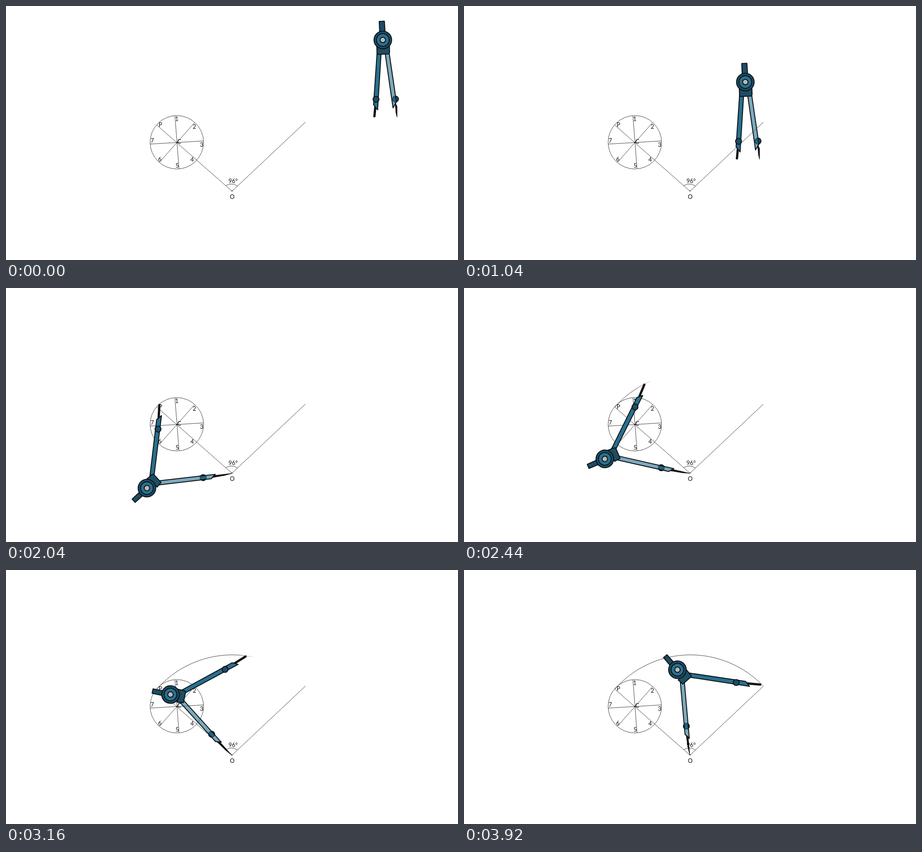
An HTML page that plays this animation: 998 px wide and 561 px high, repeating every 3.96 s.

```html
<!DOCTYPE html>
<html lang="en">
<head>
<meta charset="utf-8">
<title>Compass construction</title>
<style>
  html, body { margin: 0; width: 100%; height: 100%; overflow: hidden; background: #fff; }
  svg { display: block; width: 998px; height: 561px; }
  .thin { fill: none; stroke: #222; stroke-width: .85; }
  text { font: 13px Lato, "Open Sans", sans-serif; text-anchor: middle; fill: #111; }
  .leg, .cap { stroke: #0c1216; stroke-width: 2; stroke-linejoin: round; }
  .leg { fill: #29708f; }
  .cap { fill: #1d4d64; }
  .lead { fill: none; stroke: #111; stroke-width: 5; stroke-linecap: round; }
  .needle { fill: #111; stroke: #111; stroke-linejoin: round; }
</style>
</head>
<body>
<svg viewBox="0 0 998 561">
  <defs>
    <linearGradient id="wipe" gradientUnits="userSpaceOnUse">
      <stop offset="0" stop-color="#222"/>
      <stop offset="1" stop-color="#222" stop-opacity="0"/>
    </linearGradient>
    <g id="head">
      <circle class="cap" r="19.5"/>
      <circle class="leg" r="14"/>
      <circle class="leg" r="6" style="fill:#b8b8b8"/>
    </g>
  </defs>

  <g class="thin">
    <circle cx="377.2" cy="301" r="59"/>
    <path d="M333 263L499 409L661 256.5M373 243L382 359M416 258L339 345M436 298L318 305"/>
    <path d="M485 397Q498 389 511 397.5"/>
  </g>
  <circle cx="377.5" cy="301.5" r="1.3"/>
  <circle cx="499" cy="408.5" r="1.1"/>
  <g id="labels"></g>

  <g id="closed">
    <path class="lead" d="M815.5 222L813.5 243.5"/>
    <path class="needle" d="M859 212L863.5 222L863.5 245.5L861 236Z"/>
    <path class="leg" d="M819.5 100H828.5L820.5 229.5L811.5 218Z"/>
    <circle class="cap" cx="817" cy="206" r="6.6"/>
    <circle class="cap" cx="860" cy="205.5" r="6.6"/>
    <path class="leg" d="M836.5 100H845.5L862 212L854.5 225Z" style="fill-opacity:.6"/>
    <path class="cap" d="M824 34L835.5 33.5L837 58H825Z"/>
    <path class="cap" d="M818.5 88H846.5L847 103L845 106L819.5 107Z"/>
    <use href="#head" x="832" y="75"/>
  </g>

  <g id="open">
    <path class="lead" d="M625 250.5L654 253"/>
    <path class="needle" d="M490.5 365L495 368L498.5 408.5L494.5 392Z"/>
    <path class="leg" d="M497 227.5L622 246L630.5 257L496 236.5Z"/>
    <circle class="cap" cx="601" cy="248.5" r="6.6"/>
    <circle class="cap" cx="491" cy="345" r="6.6"/>
    <path class="leg" d="M477.5 246L488 363L497.5 372L486.5 246Z" style="fill-opacity:.6"/>
    <path class="cap" d="M440.5 193.5L448 187L465 206L457 213Z"/>
    <path class="cap" d="M473 243L483 252L501.5 236V233L490 219Z"/>
    <use href="#head" x="471.3" y="220.3"/>
  </g>

  <path id="arc" class="thin" style="stroke:url(#wipe)" d="M333 263A222.3 222.3 0 0 1 661 256.5"/>
</svg>
<script>
const LOOP = 3960, FRAME = 40;
const MOVE_START = 116, MOVE_END = 1823, SPIN_START = 1990;
const $ = id => document.getElementById(id);
const progress = (t, from, to) => Math.min(1, Math.max(0, (t - from) / (to - from)));
const easeInOut = u => u < .5 ? 2 * u * u : 1 - 2 * (1 - u) ** 2;

const labels = [
  ["P", 341, 267], ["1", 377, 254], ["2", 416, 271], ["3", 432, 311], ["4", 411, 344],
  ["5", 378, 357], ["6", 339.5, 342.5], ["7", 323, 302], ["C", 382.5, 303.5],
  ["O", 499.5, 425.5], ["96°", 501.5, 390.5]
];
$("labels").innerHTML = labels.map(([s, x, y]) => `<text x="${x}" y="${y}">${s}</text>`).join("");

function draw(now) {
  const t = Math.floor(now % LOOP / FRAME) * FRAME;
  const move = easeInOut(progress(t, MOVE_START, MOVE_END));
  const swap = progress(t, MOVE_END, SPIN_START);
  const spin = progress(t, SPIN_START, LOOP);

  $("closed").setAttribute("transform", `translate(${-364 * move} ${160.5 * move})`);
  $("closed").setAttribute("opacity", 1 - swap);
  $("open").setAttribute("transform", `rotate(${96 * spin - 94.05} 499 409)`);
  $("open").setAttribute("opacity", swap);

  // The arc is revealed from the left behind a soft edge.
  const edge = 333 + 364 * spin;
  $("wipe").setAttribute("x1", edge - 36);
  $("wipe").setAttribute("x2", edge);
  $("arc").setAttribute("visibility", spin > 0 ? "visible" : "hidden");
}

const start = performance.now();
(function tick() {
  draw(performance.now() - start);
  requestAnimationFrame(tick);
})();
</script>
</body>
</html>
```
